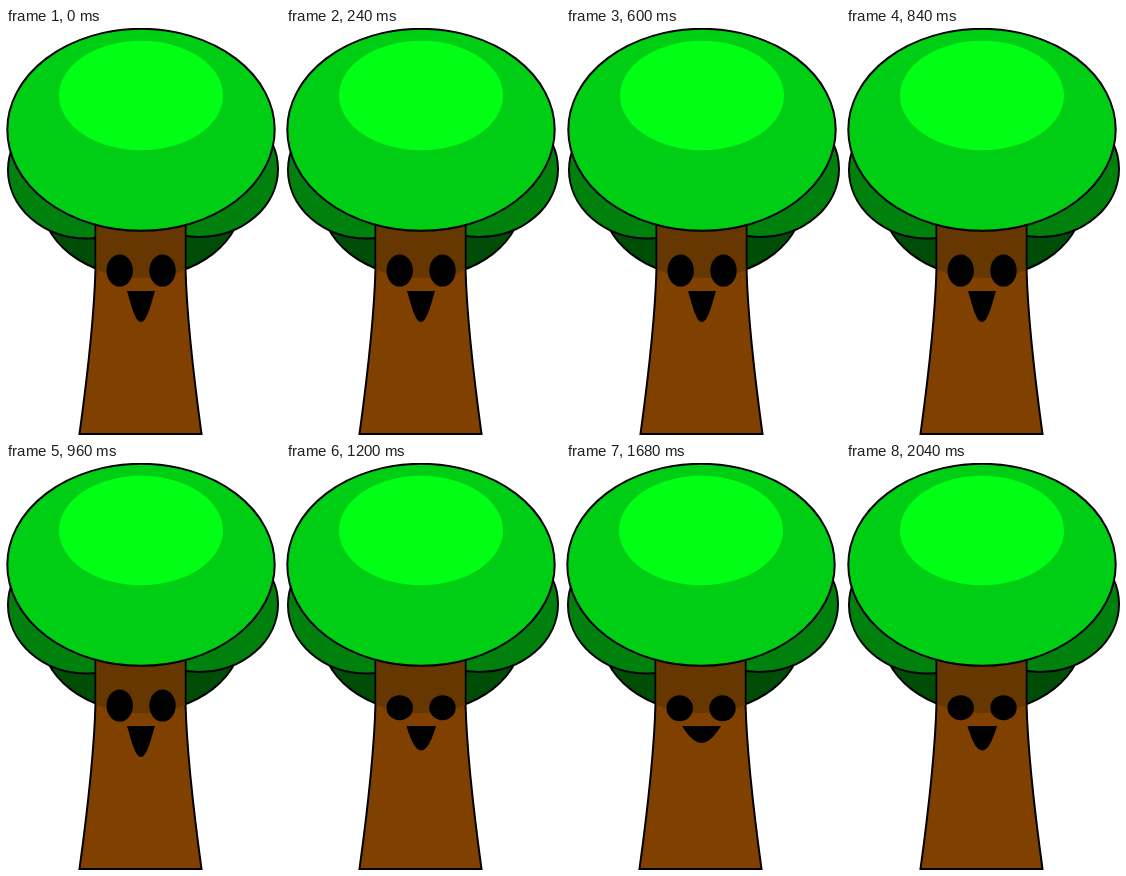
Write an HTML page that moves like this. It is 274 px wide and 407 px high and loops after 2.16 s.

```html
<!DOCTYPE html>
<html lang="en">
<head>
<meta charset="utf-8">
<title>Smiling tree</title>
<style>
html, body { margin: 0; width: 100%; height: 100%; overflow: hidden; background: #fff; }
svg { display: block; width: 274px; height: 407px; }
.line { stroke: #000; stroke-width: 2; }
</style>
</head>
<body>
<svg viewBox="0 0 274 407">
  <clipPath id="bark"><path d="M90.5 190V240Q89 300 74.5 405H194.5Q180 300 178.5 240V190Z"/></clipPath>
  <g id="tree">
    <ellipse class="line" cx="135.5" cy="170" rx="101" ry="79" fill="#004d08"/>
    <g class="line" fill="#00800c">
      <ellipse cx="81" cy="142" rx="79" ry="68.5"/>
      <ellipse cx="193" cy="141" rx="79" ry="68"/>
    </g>
    <path class="line" fill="#804000" d="M89.5 190V240Q88 300 73.5 406H195.5Q181 300 179.5 240V190Z"/>
    <ellipse clip-path="url(#bark)" cx="135.5" cy="170" rx="101" ry="80" fill="#663700"/>
    <ellipse class="line" cx="135" cy="101.8" rx="133.7" ry="101" fill="#00ce14"/>
    <ellipse cx="135" cy="67.5" rx="82" ry="54.7" fill="#00ff14"/>
    <ellipse class="eye" cx="113.7" rx="13.2"/>
    <ellipse class="eye" cx="156.5" rx="13.2"/>
    <path id="mouth"/>
  </g>
</svg>
<script>
const STEP = 120, COUNT = 18;
const tree = document.getElementById('tree');
const mouth = document.getElementById('mouth');
const eyes = document.querySelectorAll('.eye');

const open = { cy: 242.6, ry: 16, mouth: 'M121 263H149C145 276 141 294 135 294S125 276 121 263Z' };
const half = { cy: 244.7, ry: 12.5, mouth: 'M120.5 263H150C147 273 142 287.5 135.2 287.5S123.5 273 120.5 263Z' };
const smile = { cy: 245.2, ry: 13, mouth: 'M116 263H155C150 271 143 280 135.5 280S121 271 116 263Z' };
const poses = [open, open, open, half, smile, half]; // three steps each

function draw(now) {
  const step = Math.floor(now / STEP) % COUNT;
  const pose = poses[Math.floor(step / 3)];
  tree.setAttribute('transform', `translate(${step % 2} 0)`);
  mouth.setAttribute('d', pose.mouth);
  for (const eye of eyes) {
    eye.setAttribute('cy', pose.cy);
    eye.setAttribute('ry', pose.ry);
  }
}

function tick() {
  draw(performance.now());
  requestAnimationFrame(tick);
}
tick();
</script>
</body>
</html>
```
